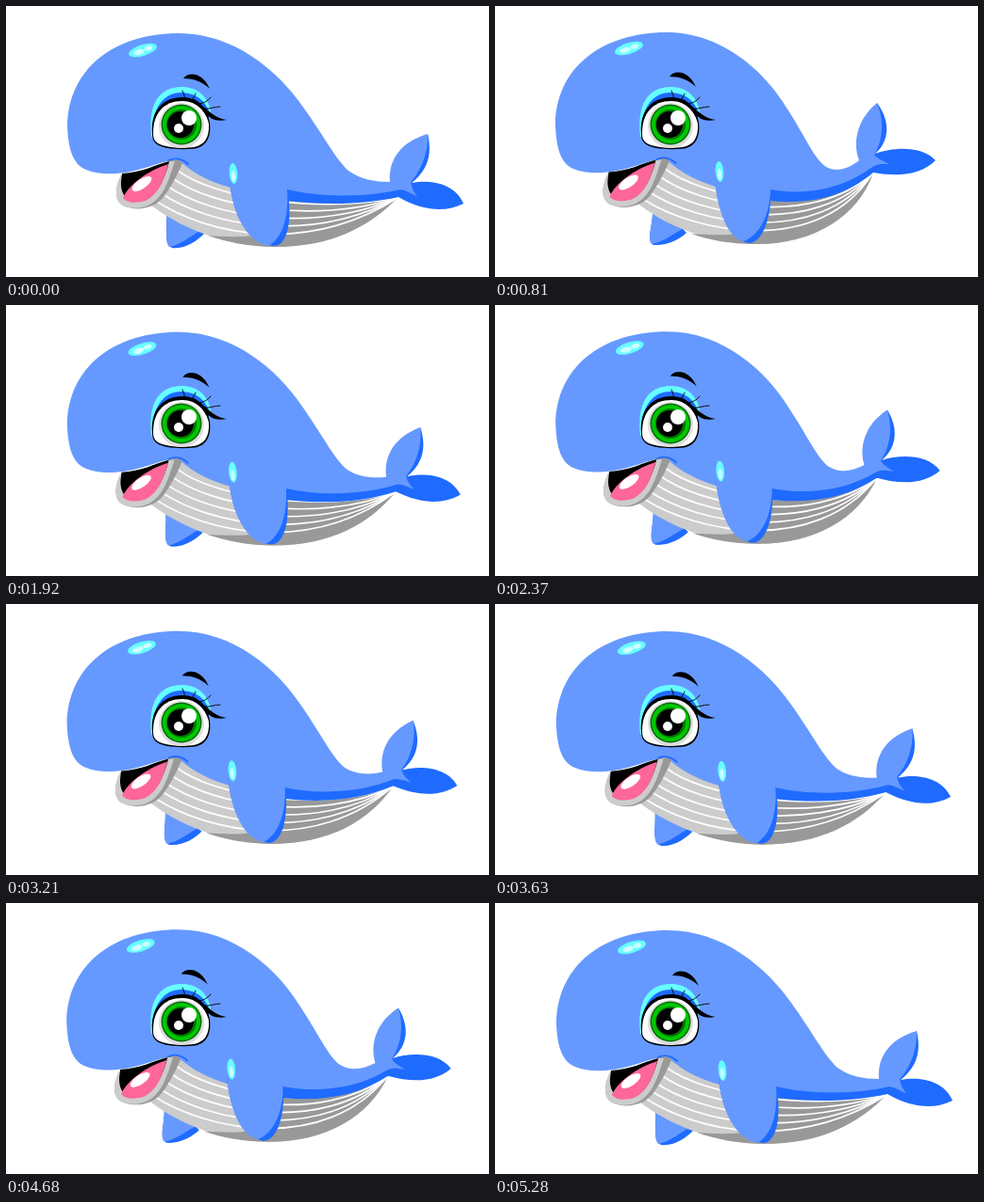
Write an HTML page with a canvas that moves like this. It is 512 px wide and 288 px high and loops after 5.58 s.

```html
<!DOCTYPE html>
<html lang="en">
<head>
<meta charset="utf-8">
<title>Swimming whale</title>
<style>
html, body { margin: 0; width: 100%; height: 100%; overflow: hidden; background: #fff; }
canvas { display: block; }
</style>
</head>
<body>
<canvas id="stage" width="512" height="288"></canvas>
<script>
const ctx = document.getElementById('stage').getContext('2d');
const LOOP = 5580, CYCLE = 1770, STEP = 30, HALF = 29;
const SKY = '#6699ff', BLUE = '#1f6bff', CYAN = '#66ffff', PALE = '#ccffff';
const LIGHT = '#cccccc', DARK = '#999999';
let lift = 0; // 0 = tail down, 1 = tail raised

const mix = (a, b) => a + (b - a) * lift;

// Blends two paths of the same structure; a pair [dx, dy] moves the first one.
function shape(a, b = [0, 0]) {
  const goal = typeof b === 'string' ? b.match(/-?[\d.]+/g) : null;
  let i = 0;
  return new Path2D(a.replace(/-?[\d.]+/g, n => {
    const to = goal ? +goal[i] : +n + b[i % 2];
    i++;
    return mix(+n, to).toFixed(3);
  }));
}

function fill(color, a, b) {
  ctx.fillStyle = color;
  ctx.fill(shape(a, b));
}

function line(color, width, a, b) {
  ctx.strokeStyle = color;
  ctx.lineWidth = width;
  ctx.stroke(shape(a, b));
}

function oval(color, x, y, rx, ry = rx, turn = 0, [dx, dy] = [0, 0]) {
  ctx.fillStyle = color;
  ctx.beginPath();
  ctx.ellipse(x + dx * lift, y + dy * lift, rx, ry, turn, 0, Math.PI * 2);
  ctx.fill();
}

function farFin() {
  fill(BLUE, 'M170 222C171 238 167 252 176 257C190 259 203 249 210 242L190 225Z',
    'M167 220C167 234 160 249 168 254C182 255 196 248 203 241L186 223Z');
  fill(SKY, 'M170 222C171 238 168 250 173 256C185 254 196 244 206 239L190 225Z',
    'M167 220C167 234 161 247 166 253C178 251 189 242 199 237L186 223Z');
}

function belly() {
  fill(LIGHT, 'M183 164C205 182 240 192 298 195L416 203C385 235 345 256 285 256C235 255 185 238 148 207Z',
    'M181 163C203 181 238 191 292 195L401 177C385 225 335 254 275 253C232 252 180 236 146 205Z');
  fill(DARK, 'M214 244C240 246 262 246 285 240L298 195L416 203C385 235 345 256 285 256C259 256 234 251 214 244Z',
    'M208 242C234 244 256 244 276 238L291 195L401 177C385 225 335 254 275 253C250 253 228 249 208 242Z');
  for (let k = 0; k < 5; k++) {
    const x = 181 - 6 * k, y = 174 + 8 * k;
    line('#fff', 1.7,
      `M${x} ${y}C${220 - k} ${205 + 10 * k} ${330 - 2.5 * k} ${220 + 11 * k} 415 204`,
      `M${x - 2} ${y - 2}C${218 - k} ${203 + 10 * k} ${333 + 3 * k} ${226 + 10 * k} 400 178`);
  }
}

function body() {
  // flukes
  fill(BLUE, 'M447 136C451 154 450 172 430 188C449 184 476 188 485 210C467 219 444 219 416 203L416 187Z',
    'M405 103C419 122 419 143 403 157C422 150 452 148 467 164C452 179 430 182 401 177L393 164Z');
  // shaded underside
  fill(BLUE, 'M296 190C340 200 385 198 418 190L430 202L416 203C380 211 340 212 298 207Z',
    'M290 190C330 197 370 189 396 169L412 174L401 177C370 203 335 211 291 207Z');
  fill(SKY,
    'M65 128C66 66 115 29 183 29C242 29 288 69 314 106C337 138 349 162 363 175C375 184 391 187 407 187' +
    'C405 162 420 144 447 136C448 155 440 175 429 187C430 193 432 198 436 202C430 200 425 196 418 195' +
    'C385 203 335 204 298 195L238 193C218 187 201 180 183 164C180 162 176 163 172 165' +
    'C160 167 145 174 126 177C110 179 97 179 85 174C70 168 66 150 65 128Z',
    'M64 127C64 66 113 28 182 28C241 28 287 70 311 111C330 141 339 163 351 171C362 177 375 173 386 164' +
    'C378 143 386 118 405 103C413 123 411 143 402 158C405 162 412 165 418 168C412 168 406 167 400 171' +
    'C370 194 330 202 292 195L234 192C216 186 199 179 181 163C178 161 174 162 170 164' +
    'C158 166 143 173 124 176C108 178 95 178 83 173C69 167 65 150 64 127Z');
}

function flipper() {
  fill(BLUE, 'M237 186C240 220 256 253 284 255C299 255 304 225 298 194Z',
    'M233 186C237 218 246 248 269 252C284 252 294 222 292 194Z');
  fill(SKY, 'M237 186C240 220 254 250 278 255C294 246 300 222 298 194L290 180Z',
    'M233 186C237 218 246 246 263 250C281 244 292 220 292 194L284 180Z');
}

function mouth() {
  const shift = [-2.5, -1.5];
  fill(DARK, 'M122 180C116 192 114 206 124 212C138 219 158 215 167 203C174 194 182 179 187 167C184 162 178 163 172 165C158 169 144 177 122 180Z', shift);
  fill(LIGHT, 'M122 180C116 192 114 206 124 212C138 218 153 214 162 203C170 194 174 180 179 165L172 165C158 169 144 177 122 180Z', shift);
  fill('#000', 'M123 178C144 177 158 169 173 165C169 182 160 206 140 208C127 209 121 198 122 186Z', shift);
  fill('#ff6699', 'M124 204C130 190 150 175 172 168C168 185 159 206 143 208C134 210 127 208 124 204Z', shift);
  oval('#fff', 144, 189, 12, 5, -0.6, shift);
  line(BLUE, 1.8, 'M173 164C179 161 187 162 193 168', [-1.5, -1]);
}

function eye() {
  fill(CYAN, 'M154 139C150 105 162 86 186 86C203 86 214 96 217 112L214 125Z');
  fill(BLUE, 'M155 137C154 108 168 91 187 92C203 93 211 101 216 114L214 125Z');
  fill('#000', 'M155 136C153 113 165 97 187 97C204 97 214 110 216 124C218 141 211 150 200 151.5C185 153 167 152 160 147C156 144 155 140 155 136Z');
  fill('#fff', 'M156 135C156 114 167 101 187 101C203 101 212 113 215 125C216 140 210 148 199 150C185 152 168 150 161 146C157 143 156 140 156 135Z');
  oval('#dddddd', 186, 127, 24);
  oval('#006600', 186, 126, 21.5);
  oval('#00c800', 186, 126, 20);
  oval('#007a00', 186, 126, 16);
  oval('#000', 185, 126, 14);
  oval('#fff', 194, 119, 8);
  oval('#fff', 183, 130, 5);
  fill('#000', 'M198 98C209 104 218 119 234 121C224 123 216 121 210 112Z');
  line('#000', 0.9, 'M189 99C190 95 188 93 187 90M196 101C198 98 200 96 201 93M205 104C210 103 214 101 217 97M210 109C216 110 220 107 227 107');
}

function details() {
  const shift = [-3, -2];
  fill('#000', 'M188 77C192 70 208 69 216 88C208 80 198 77 188 77Z', shift);
  oval(CYAN, 145, 47, 15.5, 6, -0.3, shift);
  oval(PALE, 141, 49, 6, 3, -0.3, shift);
  oval(PALE, 151, 45, 4.5, 2.5, -0.3, shift);
  oval(CYAN, 241, 178, 4.3, 11, -0.08, shift);
  oval(PALE, 241, 181, 2.2, 6, -0.08, shift);
}

function draw(time) {
  const step = Math.floor((time % CYCLE) / STEP);
  // the last pose rests until the loop restarts
  const n = time >= 3 * CYCLE - STEP ? 0 : step;
  lift = (1 - Math.abs(n - HALF) / HALF) / 0.931;
  ctx.fillStyle = '#fff';
  ctx.fillRect(0, 0, 512, 288);
  ctx.lineCap = 'round';
  farFin();
  belly();
  body();
  flipper();
  mouth();
  eye();
  details();
}

const start = performance.now();
function tick() {
  draw((performance.now() - start) % LOOP);
  requestAnimationFrame(tick);
}
tick();
</script>
</body>
</html>
```
